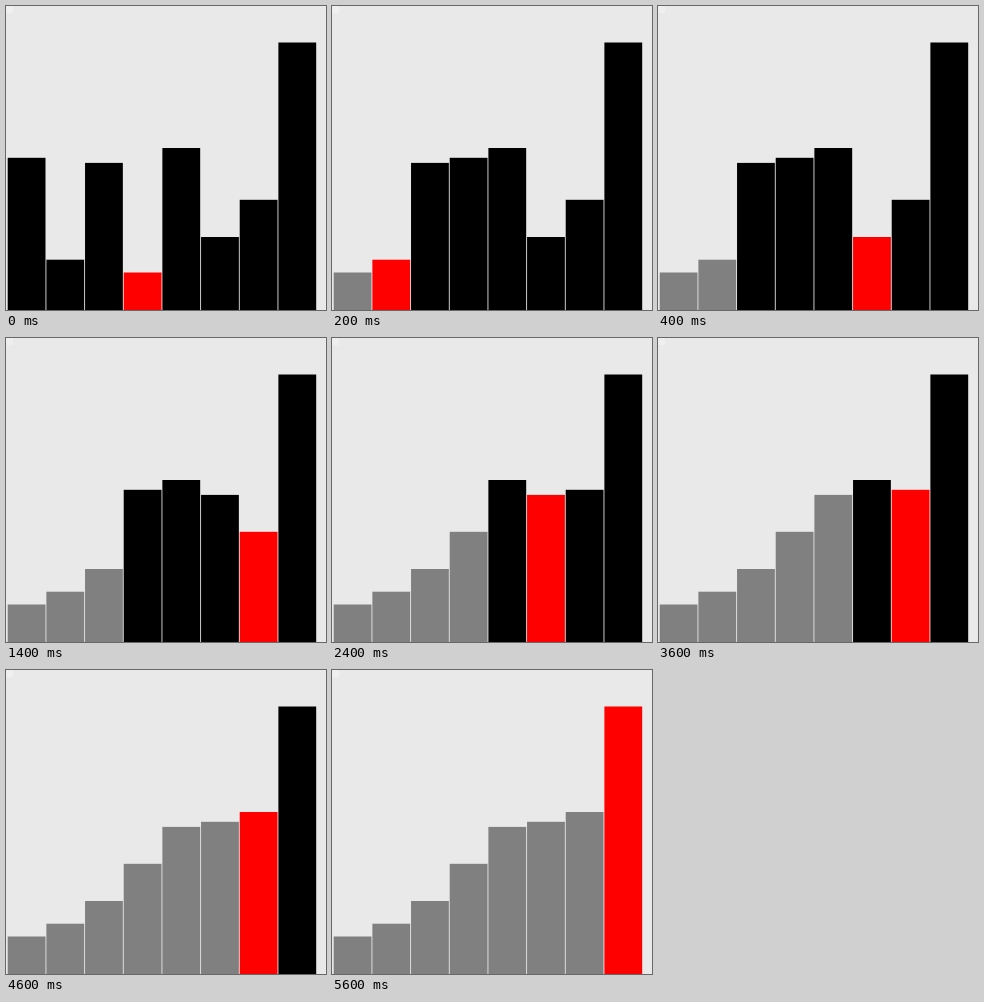
Recreate the animation shown at these times as an HTML page with a canvas. Size 320 px wide and 304 px high, loop 6.6 s.

```html
<!DOCTYPE html>
<html lang="en">
<head>
<meta charset="utf-8">
<title>Selection sort</title>
<style>
html, body { margin: 0; width: 100%; height: 100%; overflow: hidden; background: #e9e9e9; }
canvas { display: block; }
</style>
</head>
<body>
<canvas id="stage" width="320" height="304"></canvas>
<script>
const W = 320, H = 304, LOOP = 6600;
const LEFT = 1.7, STEP = 38.67, BAR = 37.8;
const tops = [151.8, 253.7, 156.9, 266.5, 142, 231, 193.8, 36.5];
const times = [0, 200, 400, 1400, 2400, 3600, 4600, 5600];
const ctx = document.getElementById('stage').getContext('2d');

// The shortest unsorted bar has the largest top.
function shortest(bars, from) {
  let best = from;
  for (let i = from + 1; i < bars.length; i++) {
    if (bars[i] > bars[best]) best = i;
  }
  return best;
}

// Bar order and highlighted bar after each number of swaps.
const states = [];
const bars = tops.slice();
for (let n = 0; n < bars.length; n++) {
  const min = shortest(bars, n);
  states.push({ bars: bars.slice(), min });
  [bars[n], bars[min]] = [bars[min], bars[n]];
}

function draw(step) {
  const { bars, min } = states[step];
  ctx.fillStyle = '#e9e9e9';
  ctx.fillRect(0, 0, W, H);
  ctx.fillStyle = '#efefef';
  ctx.fillRect(0, 0, 7, 7);
  bars.forEach((top, i) => {
    ctx.fillStyle = i === min ? '#ff0000' : i < step ? '#808080' : '#000';
    ctx.fillRect(LEFT + i * STEP, top, BAR, H - top);
  });
}

const start = performance.now();
let shown = 0;
draw(shown);

function tick() {
  const t = (performance.now() - start) % LOOP;
  const step = times.filter(at => at <= t).length - 1;
  if (step !== shown) draw(shown = step);
  requestAnimationFrame(tick);
}
requestAnimationFrame(tick);
</script>
</body>
</html>
```
